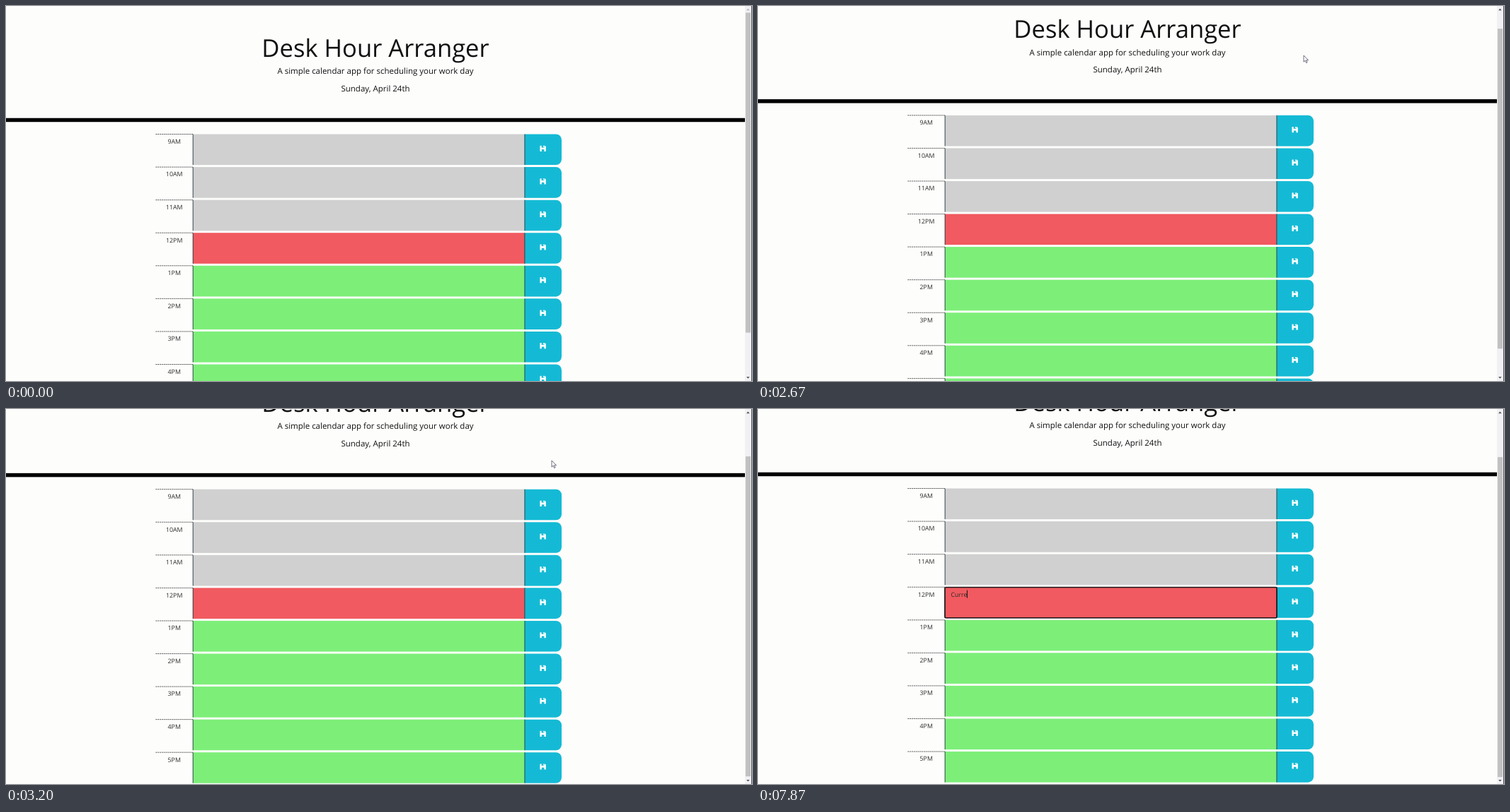
Recreate the animation shown at these times as an HTML page. Size 1054 by 531 pixels, loop 8 s.

```html
<!DOCTYPE html>
<html lang="en">
<head>
<meta charset="utf-8">
<title>Desk Hour Arranger</title>
<style>
  html, body { margin: 0; width: 100%; height: 100%; overflow: hidden; background: #fdfdfc; }
  svg { display: block; width: 1054px; height: 531px; }
  text { font-family: "Open Sans", "Noto Sans", sans-serif; fill: #111; text-rendering: geometricPrecision; white-space: pre; }
  .mid { text-anchor: middle; }
  .small { font-size: 8.85px; fill: #2c2c2c; }
</style>
</head>
<body>
<svg id="stage" viewBox="0 0 1054 531">
  <rect width="1054" height="531" fill="#fdfdfc"/>
  <g id="page">
    <text class="mid" x="522" y="71.5" font-size="34.6">Desk Hour Arranger</text>
    <text class="mid" x="522" y="96.3" font-size="11.5">A simple calendar app for scheduling your work day</text>
    <text class="mid" x="522" y="120.6" font-size="11.5">Sunday, April 24th</text>
    <rect y="158.7" width="1044" height="5.5" fill="#000"/>
    <g id="rows"></g>
    <g id="focus">
      <rect x="264" y="321.6" width="469" height="43.2" rx="1.5" fill="none" stroke="#1a1012" stroke-width="1.5"/>
      <text id="typed" class="small" x="272.4" y="334.6"></text>
      <rect id="caret" y="325.6" width="1" height="11" fill="#1a1012"/>
    </g>
  </g>
  <rect x="1044" width="9" height="531" fill="#f0f0f5"/>
  <rect id="thumb" x="1045" y="9.5" width="7" height="453" fill="#c1c1c1"/>
  <path id="up" d="M1046.2 6.2h4.4l-2.2-2.6z"/>
  <path d="M1046.2 525h4.4l-2.2 2.6z" fill="#505050"/>
  <rect x="1053" width="1" height="531" fill="#55555c"/>
  <path id="cursor" d="M0 0V9.2L2.1 7.2 3.6 10.6 5.1 9.9 3.6 6.7H6.5Z" fill="#fff" stroke="#4c4c60" stroke-width=".8"/>
</svg>
<script>
const LOOP = 8000, TICK = 100 / 3;
const ROW_TOP = 181.5, ROW_STEP = 46.57, ROW_HEIGHT = 43.6;
const NS = 'http://www.w3.org/2000/svg';
const $ = id => document.getElementById(id);

function add(parent, tag, attrs, text) {
  const el = document.createElementNS(NS, tag);
  for (const key in attrs) el.setAttribute(key, attrs[key]);
  if (text) el.textContent = text;
  parent.append(el);
}

function addRow(label, i) {
  const y = ROW_TOP + i * ROW_STEP;
  const fill = i < 3 ? '#d0d0d1' : i === 3 ? '#f05a60' : '#7def79';
  const g = $('rows');
  add(g, 'path', { d: `M211.5 ${y}H264`, stroke: '#333', 'stroke-width': .9, 'stroke-dasharray': '1.75 1.05' });
  add(g, 'text', { class: 'mid small', x: 237.7, y: y + 13.4 }, label);
  add(g, 'rect', { x: 264, y, width: 469, height: ROW_HEIGHT, fill });
  add(g, 'path', {
    d: `M733 ${y}h44a8 8 0 0 1 8 8v${ROW_HEIGHT - 16}a8 8 0 0 1 -8 8h-44z`, fill: '#14bad5'
  });
  add(g, 'path', {
    d: `M264.2 ${y}v${ROW_HEIGHT}M732.9 ${y}v${ROW_HEIGHT}`, stroke: '#26383c', 'stroke-width': .9
  });
  // Floppy disk
  add(g, 'path', {
    transform: `translate(754.4 ${y + 16.2})`, fill: '#fff',
    d: 'M.6 0H2.2V2.7H6V0H7L8.4 1.4V7.6Q8.4 8.2 7.8 8.2H6V5.4H2.4V8.2H.6Q0 8.2 0 7.6V.6Q0 0 .6 0ZM4.5 0H5.5V2H4.5Z'
  });
}
['9AM', '10AM', '11AM', '12PM', '1PM', '2PM', '3PM', '4PM', '5PM'].forEach(addRow);

const KEYS = [6930, 7200, 7370, 7730, 7870];
const BLINKS = [4730, 5330, 5900, 6430];
const PATH = [[3667, 771, 73], [3930, 783, 150], [4167, 778, 243], [4267, 724, 266]];
const CARET_X = [272.4, 278, 283.4, 287, 290.6, 295];

function ease(t, start, end) {
  const u = Math.min(1, Math.max(0, (t - start) / (end - start)));
  return 1 - (1 - u) ** 1.42;
}

function cursorAt(t) {
  if (t < PATH[0][0]) return [771, t < 2997 ? 70 : 73];
  for (let i = 1; i < PATH.length; i++) {
    const [t0, x0, y0] = PATH[i - 1], [t1, x1, y1] = PATH[i];
    if (t < t1) {
      const u = (t - t0) / (t1 - t0);
      return [x0 + (x1 - x0) * u, y0 + (y1 - y0) * u];
    }
  }
  return PATH[PATH.length - 1].slice(1);
}

const show = (id, on) => $(id).setAttribute('visibility', on ? 'visible' : 'hidden');
const passed = (times, t) => times.filter(at => t >= at).length;

function draw(t) {
  const tick = Math.floor((t + 3.4) / TICK + 1e-6) * TICK;
  const scroll = 54.7 * ease(tick, 2566, 2834) + 14.3 * ease(tick, 3033, 3234);
  $('page').setAttribute('transform', `translate(0 ${-scroll})`);
  $('thumb').setAttribute('transform', `translate(0 ${scroll * .85})`);
  $('up').setAttribute('fill', scroll > 0 ? '#505050' : '#b5b5b5');

  const [x, y] = cursorAt(tick);
  $('cursor').setAttribute('transform', `translate(${x} ${y})`);
  show('cursor', t >= 2570 && t < 4430);

  const count = passed(KEYS, t);
  const focused = t >= 4430;
  show('focus', focused);
  $('typed').textContent = 'Curre'.slice(0, count);
  $('caret').setAttribute('x', CARET_X[count]);
  show('caret', focused && (count > 0 || passed(BLINKS, t) % 2 === 0));
}

const start = performance.now();
function frame() {
  draw((performance.now() - start) % LOOP);
  requestAnimationFrame(frame);
}
draw(0);
requestAnimationFrame(frame);
</script>
</body>
</html>
```
